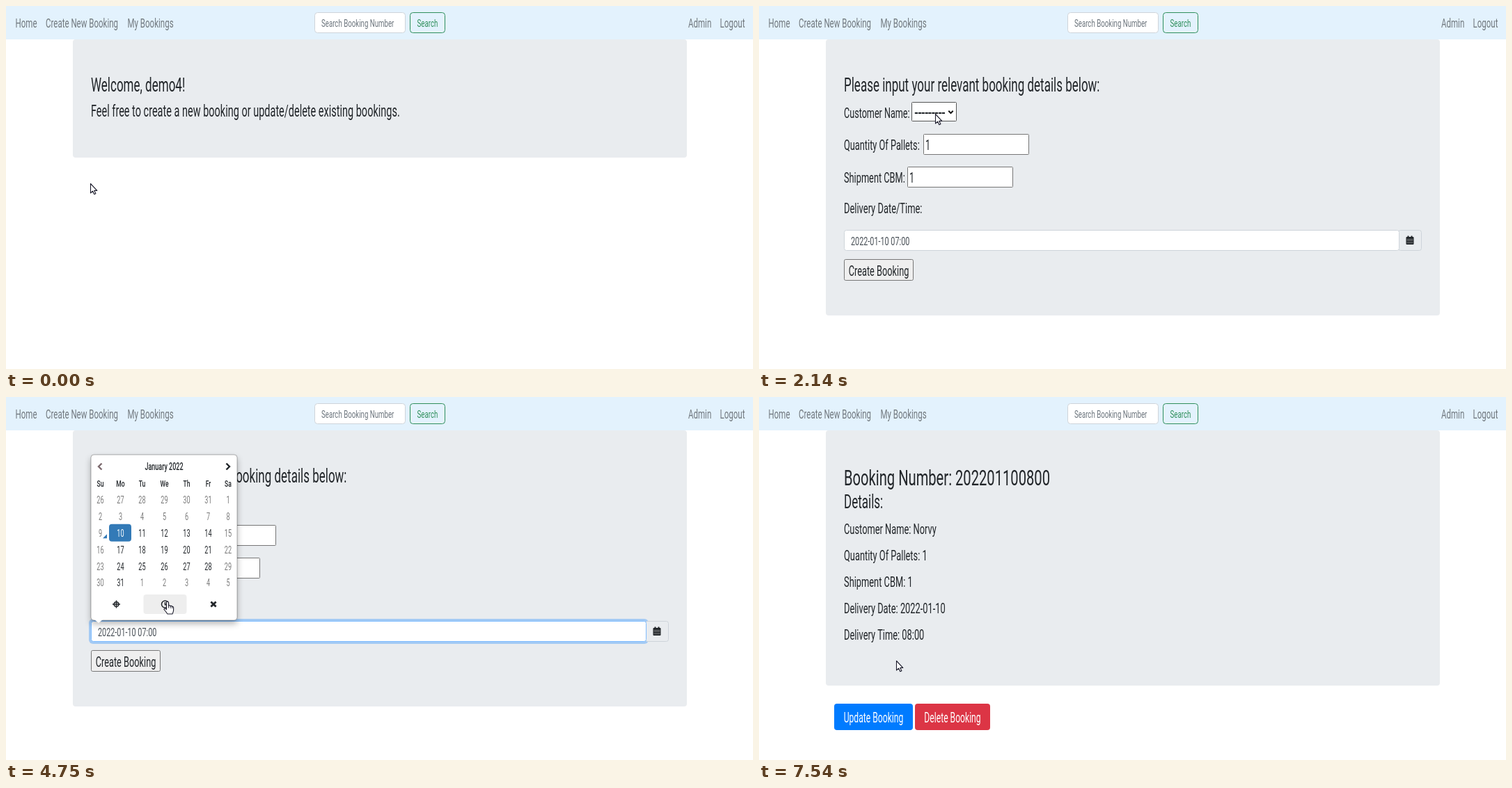
Animation of 1073x522 px, one loop 8000 ms. Source, as an HTML page with a canvas:

```html
<!DOCTYPE html>
<html lang="en">
<head>
<meta charset="utf-8">
<title>Booking demo</title>
<style>
html, body { margin: 0; width: 100%; height: 100%; overflow: hidden; background: #fff }
canvas { display: block }
</style>
</head>
<body>
<canvas id="stage" width="1073" height="522"></canvas>
<script>
const ctx = document.getElementById('stage').getContext('2d');
const LOOP = 8000, CONDENSE = 0.63;
const INK = '#212529', GREY = '#7b7b7b', BLUE = '#007bff', PANEL = '#e9ecef';
const CUSTOMER = 'Norvy';
const OPTIONS = ['---------', CUSTOMER, 'Kelda'];

// Times of the hard changes
const T = { form: 1210, drop: 2320, pick: 2960, calendar: 4020, clock: 4890, hour: 5800, close: 6560, result: 7540 };

// Pointer path: time, x, y
const PATH = [
  [0, 121, 255], [400, 121, 255], [930, 111, 38], [1040, 109, 30], [1250, 109, 30],
  [1980, 256, 168], [2140, 253, 155], [2300, 253, 155], [2680, 249, 196], [2790, 249, 196],
  [2820, 251, 198], [2960, 251, 198], [3150, 298, 197], [3310, 296, 240], [3450, 296, 240],
  [3810, 300, 337], [4020, 300, 337], [4350, 302, 232], [4750, 232, 294], [4890, 232, 294],
  [5500, 178, 180], [5670, 176, 177], [5850, 176, 177], [6500, 417, 400], [6600, 417, 400],
  [7340, 197, 379], [8000, 197, 379]
];
const ARROW = new Path2D('M.5 .5V14L3.6 11.2L5.8 15.8L7.9 14.8L5.8 10.4H9.8Z');
const HAND = new Path2D('M-1.5 1.2Q0-1 1.5 1.2V6.2Q3 5 4.2 6.6Q6 5.8 6.8 7.4Q8.6 7 8.6 9V13Q8.4 15 7 18H0Q-2 15-5 11.5Q-4.5 9.3-2.5 10.5L-1.5 11.5Z');

const ease = k => k * k * (3 - 2 * k);
const inside = (p, x, y, w, h) => p.x >= x && p.x <= x + w && p.y >= y && p.y <= y + h;

function pointerAt(t) {
  const i = Math.max(1, PATH.findIndex(k => k[0] > t));
  const [t0, x0, y0] = PATH[i - 1], [t1, x1, y1] = PATH[i];
  const k = ease((t - t0) / (t1 - t0));
  return { x: x0 + (x1 - x0) * k, y: y0 + (y1 - y0) * k };
}

// y is the middle of the capitals
function text(str, x, y, size, color = INK, align = 'left', weight = 400) {
  ctx.save();
  ctx.translate(x, y + size * 0.355);
  ctx.scale(CONDENSE, 1);
  ctx.font = `${weight} ${size}px Roboto, sans-serif`;
  ctx.textAlign = align;
  ctx.fillStyle = color;
  ctx.fillText(str, 0, 0);
  ctx.restore();
}

function box(x, y, w, h, fill, stroke, r = 0, line = 1) {
  const o = stroke ? line / 2 : 0;
  ctx.beginPath();
  ctx.roundRect(x + o, y + o, w - 2 * o, h - 2 * o, r);
  if (fill) { ctx.fillStyle = fill; ctx.fill(); }
  if (stroke) { ctx.strokeStyle = stroke; ctx.lineWidth = line; ctx.stroke(); }
}

function lines(d, x, y, color = INK, width = 2, fill) {
  ctx.save();
  ctx.translate(x, y);
  const p = new Path2D(d);
  if (fill) { ctx.fillStyle = color; ctx.fill(p); }
  else { ctx.strokeStyle = color; ctx.lineWidth = width; ctx.stroke(p); }
  ctx.restore();
}

function nav(hover) {
  const link = 'rgba(0,0,0,.5)';
  box(0, 0, 1073, 48, '#e3f2fd');
  text('Home', 13.5, 24.5, 18.3, link);
  text('Create New Booking', 57, 24.5, 18.3, hover ? 'rgba(0,0,0,.72)' : link);
  text('My Bookings', 174.5, 24.5, 18.3, link);
  text('Admin', 980, 24.5, 18.3, link);
  text('Logout', 1025.5, 24.5, 18.3, link);
  box(443, 9, 131, 30, '#fff', '#ced4da', 4);
  text('Search Booking Number', 453, 24.5, 15.4, '#6c757d');
  box(580, 9, 51, 30, null, '#2f8f5b', 4);
  text('Search', 605.5, 24.5, 15.4, '#2f8f5b', 'center');
}

const panel = bottom => box(96, 48, 882, bottom - 48, PANEL, null, 4);

function home() {
  panel(218);
  text('Welcome, demo4!', 122, 113.5, 27);
  text('Feel free to create a new booking or update/delete existing bookings.', 122, 151, 23);
}

function result() {
  panel(415);
  text('Booking Number: 202201100800', 122, 115.5, 32);
  text('Details:', 122, 150, 27);
  ['Customer Name: ' + CUSTOMER, 'Quantity Of Pallets: 1', 'Shipment CBM: 1',
    'Delivery Date: 2022-01-10', 'Delivery Time: 08:00']
    .forEach((s, i) => text(s, 122, 189.5 + 38 * i, 20.4));
  box(108, 441, 113, 38, BLUE, null, 4);
  text('Update Booking', 164.5, 461, 19.3, '#fff', 'center');
  box(224, 441, 108, 38, '#dc3545', null, 4);
  text('Delete Booking', 278, 461, 19.3, '#fff', 'center');
}

function choice(str, y, color) {
  const dashes = str[0] === '-';
  text(str, 223.5, dashes ? y - 1 : y + 0.5, dashes ? 28 : 20, color);
}

function numberField(label, x, y, hover) {
  text(label, 122, y + 16, 20.3);
  box(x, y, 152, 30, '#fff', '#767676', 1);
  text('1', x + 3, y + 15.5, 20);
  if (hover) {
    box(x + 135, y + 2, 15, 26, '#efefef');
    lines('M-3.5 2L0-2L3.5 2Z', x + 143, y + 9.5, '#505050', 0, true);
    lines('M-3.5-2L0 2L3.5-2Z', x + 143, y + 20.5, '#505050', 0, true);
  }
}

function calendarIcon(x, y) {
  box(x - 5.5, y - 5, 11, 11, INK, null, 1);
  box(x - 3.5, y - 6.5, 2, 3, INK);
  box(x + 1.5, y - 6.5, 2, 3, INK);
  for (const dy of [-2, 0.5, 3]) box(x - 4.5, y + dy, 9, 0.6, '#bbb');
}

function form(t, p) {
  const focus = t >= T.calendar && t < T.close;
  panel(445);
  text('Please input your relevant booking details below:', 122, 113.5, 27);
  text('Customer Name:', 122, 153.5, 20);
  const active = t >= T.drop && t < T.calendar;
  box(219, 138, 65, 28, '#fff', active ? '#101010' : '#555', active ? 3 : 1, active ? 2 : 1);
  choice(OPTIONS[t < T.pick ? 0 : 1], 153);
  lines('M-3.2-1.8L0 1.6L3.2-1.8', 275.5, 152.5, '#111', 2);
  numberField('Quantity Of Pallets:', 236, 184, inside(p, 236, 184, 152, 30));
  numberField('Shipment CBM:', 213, 231, inside(p, 213, 231, 152, 30));
  text('Delivery Date/Time:', 122, 291, 20.5);
  if (focus) box(119, 319, 804, 36, 'rgba(0,123,255,.3)', null, 6);
  box(918, 322, 34, 30, PANEL, '#ced4da', 3);
  box(122, 322, 798, 30, '#fff', focus ? '#80bdff' : '#ced4da', 3);
  text(`2022-01-10 0${t < T.hour ? 7 : 8}:00`, 132, 337.5, 17.2, '#495057');
  calendarIcon(935, 337);
  box(122, 364, 100, 31, '#efefef', '#767676', 2);
  text('Create Booking', 172, 381, 20.3, INK, 'center');

  if (t >= T.drop && t < T.pick) {
    box(219, 166, 65, 86, '#fff', '#767676');
    const hot = p.y < 167 ? 0 : Math.min(2, Math.floor((p.y - 167) / 28));
    OPTIONS.forEach((s, i) => {
      if (i === hot) box(220, 167 + 28 * i, 63, 28, '#1967d2');
      choice(s, 181 + 28 * i, i === hot ? '#fff' : INK);
    });
  }
  if (focus) picker(t, p);
}

function clipped(y, h, draw) {
  if (h < 0.5) return;
  ctx.save();
  ctx.beginPath();
  ctx.rect(122, y, 210, h);
  ctx.clip();
  draw();
  ctx.restore();
}

function days(y, p) {
  const cols = [135.5, 164.5, 195.5, 227.5, 259.5, 290.5, 319];
  lines('M2.5-4.5L-2 0L2.5 4.5', 135, y + 17, '#7d6b6f', 2.4);
  text('January 2022', 227, y + 17, 14.3, INK, 'center', 500);
  lines('M-2.5-4.5L2 0L-2.5 4.5', 319, y + 17, INK, 2.4);
  'Su Mo Tu We Th Fr Sa'.split(' ').forEach((s, c) => text(s, cols[c], y + 41, 13.6, INK, 'center', 500));
  for (let n = 0; n < 42; n++) {
    const c = n % 7, cx = cols[c], cy = y + 64.5 + 23.85 * Math.floor(n / 7);
    const day = n - 5, chosen = day === 10;
    const open = day >= 10 && day <= 31 && c > 0 && c < 6;
    if (chosen) box(148, cy - 12.5, 32, 25, '#337ab7', null, 4);
    else if (open && inside(p, cx - 16, cy - 12, 32, 24)) box(cx - 16, cy - 12, 32, 24, '#eee', null, 4);
    if (day === 9) lines('M0 0V-6L-6 0Z', 145, cy + 8, '#337ab7', 0, true);
    text(day < 1 ? day + 31 : day > 31 ? day - 31 : day, cx, cy + 0.5, 14.5,
      chosen ? '#fff' : open ? INK : GREY, 'center');
  }
}

function hours(y, t, p) {
  const step = (d, cy) => {
    if (inside(p, 156, cy - 21.5, 43, 43)) box(156, cy - 21.5, 43, 43, '#eee', null, 4);
    lines(d, 177.5, cy, '#3f9bff', 2.6);
  };
  step('M-4 2.2L0-2L4 2.2', y + 26.5);
  text(t < T.hour ? '07' : '08', 178, y + 78, 17, INK, 'center', 500);
  box(271, y + 66, 24, 27, '#59a8ff', null, 4);
  text('AM', 283, y + 80, 14, '#fff', 'center');
  step('M-4-2.2L0 2L4-2.2', y + 130);
}

function picker(t, p) {
  const k = ease(Math.min(1, Math.max(0, (t - T.clock) / 350)));
  const dateH = 191 * (1 - k), timeH = 163 * k;
  const height = 47 + dateH + timeH, top = 321 - height;
  ctx.save();
  ctx.shadowColor = 'rgba(0,0,0,.3)';
  ctx.shadowBlur = 10;
  ctx.shadowOffsetY = 5;
  box(122, top, 210, height, '#fff', null, 4);
  ctx.restore();
  box(121.5, top - 0.5, 211, height + 1, null, 'rgba(0,0,0,.3)', 4);
  lines('M-6 0H6L0 5Z', 133, 320, '#fff', 0, true);

  clipped(top, dateH, () => days(top, p));
  clipped(321 - timeH, timeH, () => hours(321 - timeH, t, p));

  const y = top + dateH + 24;
  for (const x of [158.5, 228.5, 298])
    if (inside(p, x - 31, y - 14, 62, 28)) box(x - 31, y - 14, 62, 28, '#eee', null, 4);
  lines('M-5.5 0H5.5M0-5.5V5.5M3.3 0A3.3 3.3 0 1 1-3.3 0A3.3 3.3 0 1 1 3.3 0', 158.5, y, INK, 1.5);
  if (t < T.clock) lines('M5 0A5 5 0 1 1-5 0A5 5 0 1 1 5 0M0-3V.7H2.8', 228.5, y, INK, 1.5);
  else calendarIcon(228, y);
  lines('M-3.6-3.6L3.6 3.6M3.6-3.6L-3.6 3.6', 298, y, INK, 2.8);
}

function pointer(t, p, overLink) {
  const onForm = t >= T.form && t < T.result;
  const open = t >= T.calendar && t < T.close;
  const popTop = t < T.clock ? 83 : 111;
  const overPicker = open && inside(p, 122, popTop, 210, 321 - popTop);
  const dropped = t >= T.drop && t < T.pick;
  const overField = onForm && !dropped && (inside(p, 236, 184, 152, 30) ||
    inside(p, 213, 231, 152, 30) || inside(p, 122, 322, 797, 30));
  if (!overLink && !overPicker && overField) {
    lines('M-3-7.5Q0-7.5 0-5.5Q0-7.5 3-7.5M0-6V6M-3 7.5Q0 7.5 0 5.5Q0 7.5 3 7.5', p.x, p.y, '#222', 1.2);
    return;
  }
  const shape = overLink || overPicker ? HAND : ARROW;
  ctx.save();
  ctx.translate(p.x, p.y);
  ctx.fillStyle = '#fff';
  ctx.fill(shape);
  ctx.strokeStyle = '#1a1a2a';
  ctx.lineWidth = 1.1;
  ctx.lineJoin = 'round';
  ctx.stroke(shape);
  if (shape === HAND) lines('M1.5 6V9.5M4.2 6.6V9.8M6.7 7.5V10', 0, 0, '#1a1a2a', 0.9);
  ctx.restore();
}

function frame(now) {
  const t = now % LOOP, p = pointerAt(t);
  const overLink = inside(p, 50, 5, 118, 36);
  ctx.fillStyle = '#fff';
  ctx.fillRect(0, 0, 1073, 522);
  nav(overLink);
  if (t < T.form) home();
  else if (t < T.result) form(t, p);
  else result();
  pointer(t, p, overLink);
}

const start = performance.now();
function loop() {
  frame(performance.now() - start);
  requestAnimationFrame(loop);
}
loop();
</script>
</body>
</html>
```
